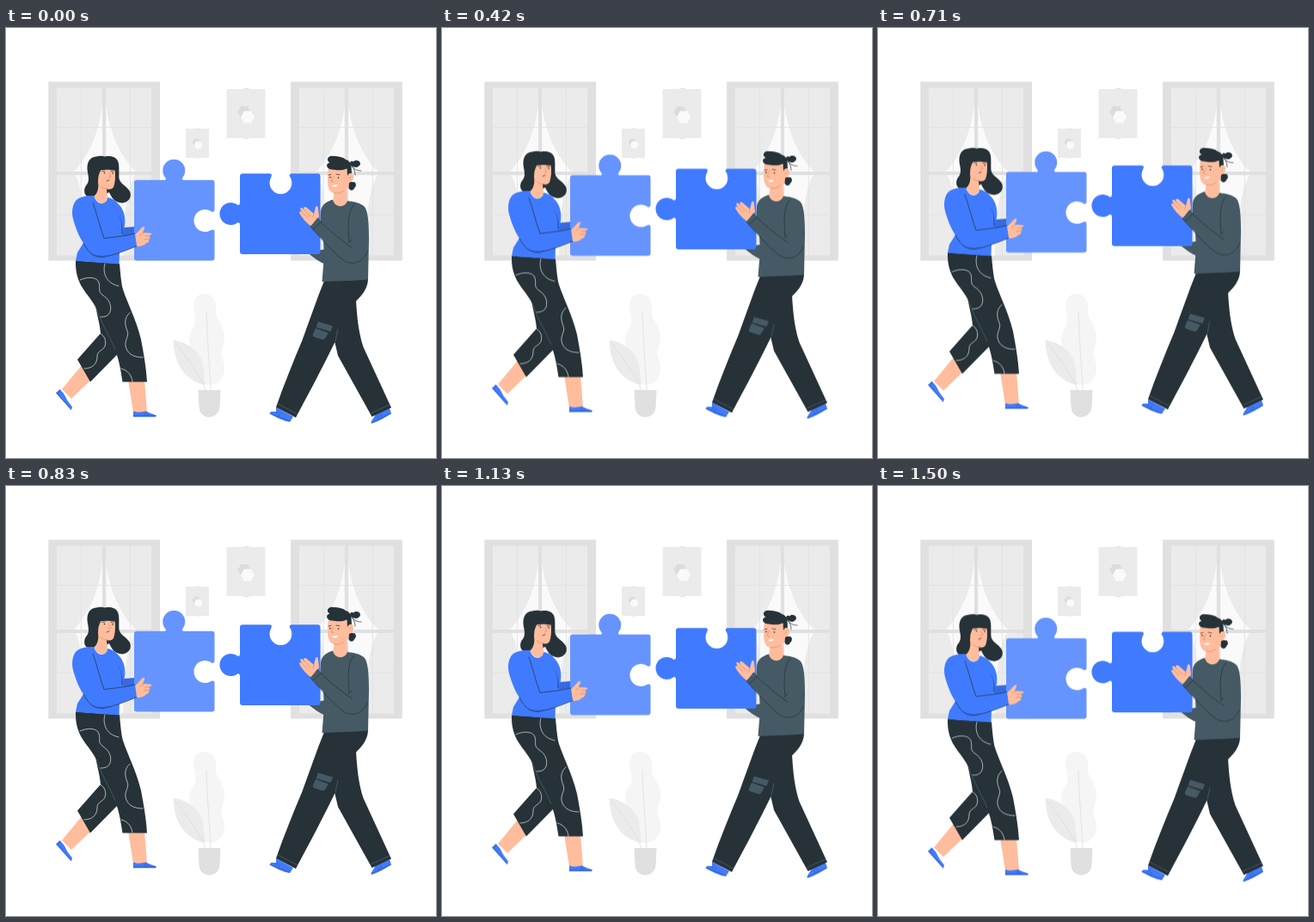
These frames come from a looping animation (500x500 px, 1540 ms). An HTML page:

```html
<!DOCTYPE html>
<html lang="en">
<head>
<meta charset="utf-8">
<title>Puzzle partners</title>
<style>
html, body { margin: 0; width: 100%; height: 100%; overflow: hidden; background: #fff; }
svg { display: block; width: 100vw; height: 100vh; }
.float { animation: float 1540ms linear infinite; }
@keyframes float {
  0% { transform: translateY(0); }
  46.5% { transform: translateY(-9.5px); }
  96.5% { transform: translateY(.4px); }
  100% { transform: translateY(0); }
}
.dark { fill: #263238; }
.blue { fill: #407bff; }
.pale { fill: #6694ff; }
.grey { fill: #455a64; }
.skin { fill: #ffbd9d; }
.line { fill: none; stroke: #263238; stroke-width: .7; stroke-linecap: round; stroke-linejoin: round; }
.chalk { fill: none; stroke: #e6ebed; stroke-width: .7; stroke-linecap: round; }
.seam { fill: none; stroke: #5b6f79; stroke-width: .6; }
.tan { fill: none; stroke: #d98b6c; stroke-width: .7; stroke-linecap: round; }
</style>
</head>
<body>
<svg viewBox="0 0 500 500">
  <defs>
    <g id="window">
      <path fill="#e0e0e0" d="M49.300 62.500h129.700v208H49.300z"/>
      <path fill="#ebebeb" d="M59 69.500h110v195H59z"/>
      <path fill="#fafafa" d="M114 70C112 100 106 124 98 139C92 151 85 161 78 168C88 178 91 210 92 264.500H136C137 210 142 180 152.500 168C144 161 137 151 131 139C123 124 116 100 114 70Z"/>
      <path fill="none" stroke="#e0e0e0" stroke-width=".8" d="M59 115.500h110M59 217h110M87.500 69V265M144.500 69V265"/>
      <path fill="#e0e0e0" d="M112 69h4.200v196H112zM59 167h110v4H59z"/>
    </g>
    <path id="hex" d="M-4-6.900H4L8 0L4 6.900H-4L-8 0Z"/>
  </defs>

  <use href="#window"/>
  <use href="#window" x="281.800"/>

  <g fill="#ebebeb">
    <path d="M256.500 71H301.500v57H256.500zM209 117h27v34H209z"/>
    <path fill="#e0e0e0" d="M275 71q4.500-2 9 0zM275 128q4.500 2 9 0zM220 117q2.500-1.500 5 0zM220 151q2.500 1.500 5 0z"/>
    <use href="#hex" fill="#dcdcdc" transform="translate(277 97.500) scale(.95)"/>
    <use href="#hex" fill="#fafafa" transform="translate(281 103.500)"/>
    <use href="#hex" fill="#dcdcdc" transform="translate(221.500 133) scale(.6)"/>
    <use href="#hex" fill="#fafafa" transform="translate(223.700 136) scale(.62)"/>
  </g>

  <path fill="#f5f5f5" d="M218 322C218 314 224 308 232 309C241 310 245 318 244 328C243 340 253 343 254 358C255 368 249 372 251 382C254 390 256 400 251 407C246 415 239 416 232 414C220 412 212 404 214 392C215 383 218 380 214 370C211 360 215 353 219 347C223 338 218 332 218 322Z"/>
  <path fill="#ebebeb" d="M194.500 363C208 364 222 374 227 385C231 395 230 406 232 415C213 412 195 395 194.500 363Z"/>
  <path fill="none" stroke="#dedede" stroke-width=".8" d="M233 330C234 365 237 395 238 421M197 366C212 387 224 400 232 421"/>
  <path fill="#e0e0e0" d="M223.500 421H249.500L248.500 441C248 448 242 452.500 236.500 452.500C230 452.500 225 448 224.500 441Z"/>

  <g class="float">
    <!-- her far arm, legs and shoes -->
    <path fill="#356ae0" d="M130 216L137 232L150 231V241L131 244Z"/>
    <path class="skin" d="M89 391L100 408L76 431L65 420ZM142 409H161L164 447H148Z"/>
    <path class="blue" d="M62.500 420L67 425C69 428 70 431 72 434L77 440.500L76 444.500L58 424.500Z"/>
    <path class="blue" d="M148 445.500C153 447.500 158 446.500 163 445.500C166 448 171 448.500 175 450.500L174 452.200H148Z"/>
    <path class="line" stroke-opacity=".5" d="M59 424L75 443M148 451H174M163 447l-2 3M166 448l-2 2.500M64 421l-3 3"/>
    <path class="dark" d="M104 322C106 335 109 343 110 355L83 385.500L98 411.500L130 379L133 340Z"/>
    <path class="dark" d="M81 270.500L132 274C133 285 134 297 136 304C142 322 151 338 157 362C160 378 163 395 164 411.500H135.500C133 395 131 383 125 370C115 351 109 340 105 326C98 312 87 304 83 289C81 282 81 277 81 270.500Z"/>
    <path class="seam" d="M105 326C111 344 121 359 127 374"/>
    <path class="chalk" d="M86 293C94 289 106 289 108 296C110 303 106 306 113 311C121 316 123 324 121 330C119 335 115 336 110 336M115 274C112 284 116 297 131 300M144 331C137 337 138 345 141 352C144 359 136 364 140 373C143 380 150 383 159 383M109 355C115 357 117 365 115 370C112 376 106 375 106 382C106 391 100 396 91 396M134 396C142 398 146 404 147 411"/>

    <!-- her hair, head and torso -->
    <path class="dark" d="M95 168C93 157 97 150 105 149.500C109 148 113 149 115 149.500C122 148 129 150 130.500 156C132 161 131 168 131.500 175C133 182 140 183 144 190C147 197 142 203 135 203.500C127 203 123 198 120 191L110 196H95C90 194 90 186 94 182C97 178 96 173 95 168Z"/>
    <path class="skin" d="M108 164H126.500C127.500 172 127 180 125 185C123 188 119 188 117 187L118 198C115 206 107 205 102 196C107 192 108 185 107 179Z"/>
    <path class="dark" d="M107 173C107 163 110 158 113 157H126L129 166C123 165 115 164 110 165.500Z"/>
    <path class="tan" d="M120 169L122 173L119 174M110 184Q114 188 118 187"/>
    <path class="line" d="M112 166.500l3-.5M122 166.500l3 .5M117 178l3-1.200"/>
    <g class="dark"><circle cx="114.500" cy="168.500" r=".8"/><circle cx="124" cy="169" r=".8"/></g>
    <path class="blue" d="M102 195C95 194.500 88 195.500 83 199C77 204 76 214 78 222C81 233 85 243 90 250L83 261L81 270.800L131.500 274.500L132 259L137 235C140 223 138 212 131 205C127 200 123 198 118 197C118 205 106 208 102 195Z"/>

    <!-- light piece -->
    <path class="pale" d="M152 176.800H184C187 176.500 186 175 184.500 173A13 13 0 1 1 206 173C204.500 175 204 176.800 208 176.800H240Q242.500 176.800 242.500 180V211.500C242 215 239 214 237.500 212.500A13 13 0 1 0 237.500 235.500C240 234 242.500 234 242.500 237V267.500Q242.500 270.400 239.500 270.400H152Q149 270.400 149 267.500V180Q149 176.800 152 176.800Z"/>

    <!-- her near arm -->
    <path class="skin" d="M150 240C153 238 155 235 158 232C160 230 162 231 161 233L159 238L168 238.500C170 239 169.500 240.500 168 241L166 243C168 243 168 245 166 246C167 248 165 250 163 250C161 253 156 254.500 150 254Z"/>
    <path class="tan" d="M160 238.500L156 241M162 242L168 241M161 246L166 245"/>
    <path class="blue" d="M92 205L114 244.500C126 243 139 241 150 239L152 253.500C138 259 126 264 113 266.500C102 267 95 259 91 251Z"/>
    <path class="line" d="M101 203C106 217 109 231 114 244.500C126 243 139 242 150 239M90 250C96 261 101 267 113 266.500C126 264 139 259 152 253.500"/>
    <path fill="#2c59bd" d="M93 255C98 262 103 265 113 265L121 263.500C113 268 102 269 93 255ZM129 216C135 222 136 230 136 239L134 239C135 229 134 222 129 216Z"/>

    <!-- his far arm, shoes and trousers -->
    <path class="grey" d="M350 261L372 257V275C364 272 358 267 350 261Z"/>
    <path class="blue" d="M314 441L334 452L330 458C322 457 314 452.500 306.500 448.500L308 446L314 446Z"/>
    <path class="blue" d="M430 449L446 442L448 448.500C441 453 433 457.500 425 460L424.500 458Z"/>
    <path class="line" stroke-opacity=".5" d="M307 448.300L330 457M425 459L447 448M316 446l-2 3M319 448l-2 3M432 451l2 3M435 449l2 3"/>
    <path class="dark" d="M385 320L407 316C408 335 410 355 415.500 371L448 441.500L425.500 452L386 381L382 364Z"/>
    <path class="dark" d="M370 294L421 291C421 301 416 309 407.500 317C399 329 391 346 383 364C369 393 352 425 337 453L314 441C323 415 334 388 344.500 363C353 340 361 316 370 294Z"/>
    <path class="grey" d="M363 341.500L380 346.500L377.500 353L360.500 348ZM360 349L375 354.500L371 361Q370 363 367 362L359 359.500Q356 358 357 356Z"/>
    <path class="seam" d="M316 437L339 449M424 448L446 438M383 364L386 350"/>

    <!-- his head -->
    <path class="skin" d="M374.500 164C384 160 396 162 399 170L401 178C401 184 399 186 396 187L397 203C394 209 383 209 380 202L381.500 192C376 191 374.500 185 374 179Z"/>
    <path class="dark" d="M376 164C372 162 372 157 376.500 156.500C371 153 375 147.500 381 149C386 149 392 150 395 153C399 154 401 157 401.500 161L402 170L399 177L397 173L396.500 163.500C390 166.500 382 165 376 164Z"/>
    <path class="dark" d="M400 158C400 155 402 154 404 155.500C407 152.500 412 154.500 412 158C411 161.500 407 163 404 161Q401 161 400 158ZM399 180C401 178 404 180 405 179C408 181 407 185 405 186C404 190 399 189 398.500 186Z"/>
    <path class="line" d="M402 161C406 165 409 166 413 166M402 159C405 164 406 167 406 171"/>
    <path class="skin" d="M397 172C399 167 404 168 404 173C404 178 400 181 397 179Z"/>
    <path class="tan" d="M381 172L378 178L381 179M382 192Q389 193 393 189M399 175l2-2"/>
    <path class="line" d="M375 171l3-.7M384 170l4 .6"/>
    <g class="dark"><circle cx="377" cy="173.500" r=".85"/><circle cx="386.500" cy="174" r=".85"/></g>
    <path fill="#fff" d="M378.500 183L386 182Q384 187 378.500 183Z"/>

    <!-- strong piece -->
    <path class="blue" d="M275 169.200H306C310 169.200 309 172 308 174A13 13 0 1 0 331 174C329 172 329 169.200 333 169.200H362.500Q365.500 169.200 365.500 172.500V260Q365.500 263 362.500 263H275Q272 263 272 260V229C272 225 269 226 267.500 227.500A13 13 0 1 1 267.500 204.500C269 206 272 207 272 203V172.500Q272 169.200 275 169.200Z"/>

    <!-- his torso and near arm -->
    <path class="skin" d="M354 230C349 226 345 222 341 215C341 213 343 213 344 214L342 210C343 208 345 209 346 211L349 214L346 210C347 207 349 208 351 210L358 216L360 208C361 206 363 207 363 210L364 219L360 226Z"/>
    <path class="tan" d="M344 214L350 220M349 214L354 219M358 216L357 220"/>
    <path class="grey" d="M380 199.500C372 202 367 206 366 213L365.500 225L362 221L354 231L369 247L370 264L367.500 295C385 294 403 294 421 292.500L422 246C422 227 421 213 417 208C412 203 404 202 397 201C394 210 382 209 380 199.500Z"/>
    <path class="line" d="M405 205C398 212 397 226 399 249M362 221.500C376 236 390 247 402 255M399 249L402 246M354 231C367 246 380 260 391 269C403 278 416 272 420 260"/>
    <path class="line" d="M366 226L357 234"/>
  </g>
</svg>
</body>
</html>
```
